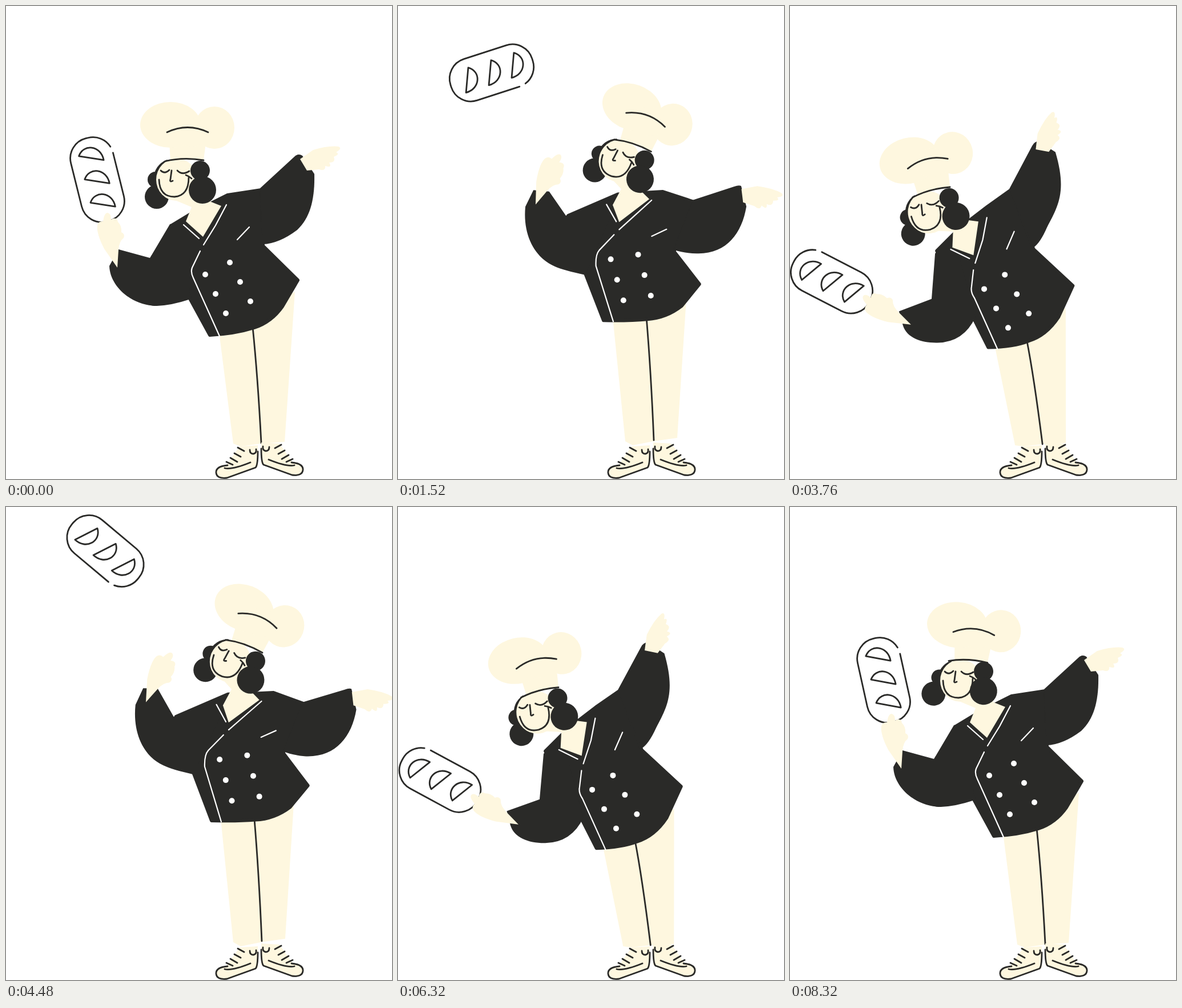
An HTML page that plays this animation: 676x828 px, repeating every 8400 ms.

```html
<!DOCTYPE html>
<html lang="en">
<head>
<meta charset="utf-8">
<title>Baker tossing a loaf</title>
<style>
  html, body { margin: 0; width: 100%; height: 100%; overflow: hidden; background: #fff; }
  svg { display: block; width: 100vw; height: 100vh; }
  path, rect { stroke-linecap: round; stroke-linejoin: round; }
  .ink { fill: #2a2a28; }
  .cloth { fill: #2a2a28; stroke: #2a2a28; stroke-width: 6; }
  .cream { fill: #fef7df; }
  .line { fill: none; stroke: #2a2a28; stroke-width: 2.8; }
  .chalk { fill: none; stroke: #fff; stroke-width: 2.2; }
  .button { fill: none; stroke: #fff; stroke-width: 10; }
</style>
</head>
<body>
<svg viewBox="0 0 676 828">
  <defs>
    <g id="shoe">
      <path class="cream" d="M409 771L441 769L441 806L437 809L386 826Q368 828 367 816Q370 806 386 804Z"/>
      <path class="line" d="M388 804Q367 806 368 817Q369 828 387 826L437 808Q441 804 441 780M383 809Q396 812 428 799M406 773L417 779M400 783L411 789M393 791L405 798M386 798L397 803M427 777Q427 784 433 784Q439 783 438 776"/>
    </g>
    <path id="score" class="line" d="M-22 3C-18 -20 13 -22 22 3Z"/>
  </defs>
  <g id="legs"></g>
  <use href="#shoe"/>
  <use href="#shoe" transform="translate(888 -5)scale(-1 1)"/>
  <g id="loaf">
    <rect class="line" style="fill:#fff" x="-38" y="-75" width="76" height="150" rx="36" pathLength="100" stroke-dasharray="97 3" stroke-dashoffset="-15.5"/>
    <use href="#score" transform="translate(0 -42)rotate(23)"/>
    <use href="#score" transform="rotate(23)"/>
    <use href="#score" transform="translate(0 42)rotate(23)"/>
  </g>
  <g id="body"></g>
  <g id="head">
    <g id="hairBack" class="ink">
      <circle cx="264" cy="334" r="21"/><circle cx="262" cy="304" r="14"/>
    </g>
    <path class="ink" d="M258 303Q260 278 282 269L300 290Z"/>
    <ellipse class="cream" cx="299" cy="304" rx="36" ry="37"/>
    <path class="line" d="M271 288Q278 295 286 287M300 288Q309 297 321 289M290 288L288 303Q286 309 292 306M268 304Q269 334 295 334Q320 332 320 300M315 296Q321 298 325 302"/>
    <g id="hairFront" class="ink">
      <circle cx="340" cy="288" r="17"/><circle cx="344" cy="322" r="24"/>
    </g>
    <g id="hat">
      <path class="cream" d="M285 225L288 270Q318 263 346 270L352 225Z"/>
      <ellipse class="cream" cx="288" cy="208" rx="53" ry="40"/>
      <ellipse class="cream" cx="365" cy="213" rx="35" ry="37"/>
      <ellipse class="cream" cx="325" cy="221" rx="28" ry="25"/>
      <path class="line" d="M282 221Q318 204 354 221M278 272Q310 264 346 270"/>
    </g>
  </g>
  <path id="holdingHand" class="cream" d="M0 0L-23 -33Q-37 -60 -35 -74Q-33 -82 -25 -81Q-23 -96 -17 -96Q-11 -95 -11 -84Q-1 -90 1 -80Q8 -73 7 -62Q14 -59 11 -52Q3 -46 2 -31Z"/>
  <path id="freeHand" class="cream" d="M-6 -10L17 -26Q44 -34 61 -32Q69 -29 57 -22Q65 -19 53 -14Q57 -4 45 -4Q51 6 38 2Q39 12 27 8L6 10Z"/>
</svg>
<script>
const STEP = 80, CYCLE = 35;
const $ = id => document.getElementById(id);
const parts = [];

// Every moving piece passes through three poses: low (-1), rest (0), thrown (1).
const pose = (p, low, rest, high) => rest + p * (high - low) / 2 + p * p * ((high + low) / 2 - rest);
const joint = (p, low, rest, high) => rest.map((r, i) => pose(p, low[i], r, high[i]));

function part(layer, cls, low, rest, high) {
  const el = document.createElementNS('http://www.w3.org/2000/svg', 'path');
  el.setAttribute('class', cls);
  $(layer).append(el);
  const numbers = s => s.match(/\d+/g).map(Number);
  parts.push({ el, rest, low: numbers(low), high: numbers(high) });
}

function morph({ el, low, rest, high }, p) {
  let i = 0;
  el.setAttribute('d', rest.replace(/\d+/g, n => pose(p, low[i], +n, high[i++]).toFixed(2)));
}

// Trousers and crease
part('legs', 'cream',
  'M358 595L394 769L408 771L442 767L483 765L482 530Z',
  'M373 570L398 766L411 771L446 766L488 763L506 500Z',
  'M376 545L398 762L411 769L447 762L489 756L505 510Z');
part('legs', 'line', 'M414 585Q427 650 442 767', 'M432 562Q441 650 447 765', 'M435 545Q443 640 448 760');

// Jacket: torso, left sleeve, right sleeve
part('body', 'cloth',
  'M285 401L256 430L322 548L347 598Q392 597 417 587Q448 578 470 545L495 490L426 426L386 322L345 352L315 375Z',
  'M325 363L292 383L322 512L357 576Q400 574 435 563Q465 553 484 526L511 480L450 420L447 322L388 331L364 343Z',
  'M386 329L298 367L328 467L360 550Q405 551 437 548Q470 546 497 525L528 487L484 430L518 343L465 325L430 327Z');
part('body', 'ink',
  'M253 435L248 514L191 537L199 562C206 583 230 591 258 591Q305 590 325 545L285 400Z',
  'M287 382L252 441L197 426L181 455C182 492 222 525 264 525Q290 524 320 514L324 370Z',
  'M294 367L265 323L238 321L224 350C219 400 240 440 275 455Q290 462 328 470L388 335Z');
part('body', 'ink',
  'M426 423Q437 415 448 388C468 350 484 325 463 255L434 237Q427 236 422 245L383 320Z',
  'M450 417Q478 416 510 392C534 370 541 335 540 294L519 262Q513 258 507 262L445 319Z',
  'M484 427Q500 433 523 434C575 436 603 400 611 352L602 316Q598 314 590 317L518 340Z');

// Neck, collar, lapel, pocket
part('body', 'cream',
  'M232 394L285 396L284 424L321 437L329 378L312 376L285 350Z',
  'M282 334L325 352L315 377L345 404L377 350L357 342L330 305Z',
  'M362 288L392 320L377 348L388 378L441 338L428 325L412 285Z');
part('body', 'chalk', 'M281 427L314 443', 'M311 383L338 407', 'M366 347L383 377');
part('body', 'chalk', 'M344 371L337 410L324 451', 'M386 348L367 384L346 418', 'M445 340L416 366L388 391');
part('body', 'chalk',
  'M321 463L318 492Q316 502 323 512L363 601',
  'M340 429L326 458Q323 466 328 476L374 578',
  'M379 400L353 427Q346 435 347 455L377 552');
part('body', 'chalk', 'M379 426L392 395', 'M405 409L426 387', 'M445 403L471 391');

// Two columns of three buttons, sheared with the cloth
for (let row = 0; row < 3; row++) for (let col = 0; col < 2; col++) {
  const spot = (x, y, downX, downY, leftX, leftY) =>
    `M${Math.round(x + row * downX - col * leftX)} ${Math.round(y + row * downY + col * leftY)}h0`;
  part('body', 'button', spot(376, 471, 21, 34, 36, 25), spot(392, 449, 18, 34, 43, 21), spot(421, 435, 11, 36, 48, 8));
}

// Cosine ease from 0 to 1 between two drawings
const ease = (f, from, to) => (1 - Math.cos(Math.PI * Math.min(1, Math.max(0, (f - from) / (to - from))))) / 2;
// Wind up, throw, settle
const lean = f => -1.04 * ease(f, 0, 11) + 2.09 * ease(f, 11, 20) - 1.05 * ease(f, 20, 34);
// Hat and hair trail behind on the way back
const trail = f => ease(f, 20, 32) - ease(f, 32, 36);

function loafAt(f, hand, swing) {
  if (f > 15 && f < 29) { // free flight around the apex at 22
    return [164 + 5 * (f - 19), 72 + 5 * (f - 22) ** 2, 72 + 29 * (f - 19)];
  }
  const [x, y, turn] = hand, angle = turn + 3 * swing, a = angle * Math.PI / 180;
  const dx = -35, dy = -154;
  return [x + dx * Math.cos(a) - dy * Math.sin(a), y + dx * Math.sin(a) + dy * Math.cos(a), angle - 14];
}

const transform = (id, value) => $(id).setAttribute('transform', value);
const place = (id, [x, y, turn], back = '') => transform(id, `translate(${x} ${y})rotate(${turn})${back}`);

function draw(ms) {
  const f = Math.floor(ms / STEP) % CYCLE;
  const p = lean(f), swing = trail(f);
  const hand = joint(p, [213, 560, -50], [195, 458, 0], [242, 346, 37]);
  parts.forEach(item => morph(item, p));
  place('holdingHand', hand);
  place('freeHand', joint(p, [440, 253, -50], [521, 278, 0], [604, 333, 24]));
  place('loaf', loafAt(f, hand, swing));
  place('head', joint(p, [237, 365, -14], [294, 305, 0], [384, 270, 20]), 'translate(-294 -305)');
  transform('hat', `rotate(${9 * swing} 312 270)`);
  transform('hairBack', `rotate(${47 * swing} 275 300)`);
  transform('hairFront', `rotate(${14 * swing} 340 280)`);
}

const start = performance.now();
function tick() {
  draw(performance.now() - start);
  requestAnimationFrame(tick);
}
tick();
</script>
</body>
</html>
```
